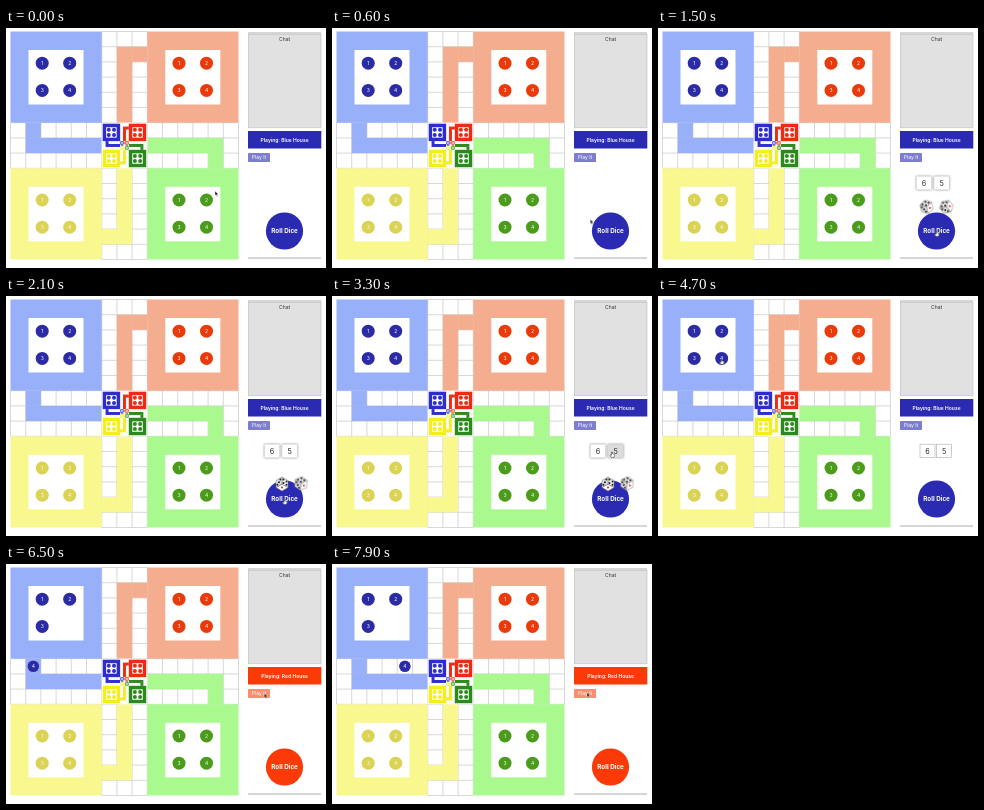
These frames come from a looping animation (320 px wide and 240 px high, 8000 ms). An HTML page:

```html
<!DOCTYPE html>
<html lang="en">
<head>
<meta charset="utf-8">
<title>Board game</title>
<style>
html, body { margin: 0; height: 100%; overflow: hidden; background: #fff; }
svg { display: block; width: 320px; height: 240px; }
text { font-family: Inter, Roboto, sans-serif; text-anchor: middle; font-size: 5px; fill: #333; }
.w { fill: #fff; }
.b { font-weight: 600; }
.num { font-size: 7.4px; }
.step { animation: 8s step-end infinite; }
.move { animation: 8s ease-in-out infinite; }
.theme { animation-name: theme; }
.before { animation-name: before; }
.after { animation-name: after; }
.rolled { animation-name: rolled; }
.picked { animation-name: picked; }
.chosen { animation-name: chosen; }
.hover { animation-name: hover; }
.play { animation-name: play; }
.walk { animation-name: walk; }
.arrow { animation-name: arrow; }
.hand { animation-name: hand; }
.cursor { animation-name: cursor; }
.die1 { animation-name: die1; animation-timing-function: ease-out; }
.die2 { animation-name: die2; animation-timing-function: ease-out; }

@keyframes theme { 0% { fill: #2a2ab2 } 78.75%, 100% { fill: #fb3a08 } }
@keyframes before { 0% { opacity: 1 } 78.75%, 100% { opacity: 0 } }
@keyframes after { 0% { opacity: 0 } 78.75%, 100% { opacity: 1 } }
@keyframes rolled { 0% { opacity: 0 } 12.5% { opacity: 1 } 45%, 100% { opacity: 0 } }
@keyframes picked { 0% { opacity: 0 } 45% { opacity: 1 } 78.75%, 100% { opacity: 0 } }
@keyframes chosen { 0% { opacity: 0 } 61.25% { opacity: 1 } 78.75%, 100% { opacity: 0 } }
@keyframes hover { 0% { fill: #fff } 37.5% { fill: #dcdcdc } 45%, 100% { fill: #fff } }
@keyframes play { 0% { opacity: .6 } 61.25% { opacity: 1 } 78.75%, 100% { opacity: .58 } }
@keyframes walk {
  0% { opacity: 0; transform: translate(27.3px, 102.3px) }
  78.75% { opacity: 1; transform: translate(27.3px, 102.3px) }
  85% { opacity: 1; transform: translate(42.5px, 102.3px) }
  91.25% { opacity: 1; transform: translate(57.7px, 102.3px) }
  97.5%, 100% { opacity: 1; transform: translate(72.9px, 102.3px) }
}
@keyframes arrow {
  0%, 29.5%, 47%, 67% { opacity: 1 }
  10.6%, 37%, 56.5%, 70% { opacity: 0 }
  78.75%, 100% { opacity: 1 }
}
@keyframes hand {
  0%, 29.5%, 47%, 67% { opacity: 0 }
  10.6%, 37%, 56.5%, 70% { opacity: 1 }
  78.75%, 100% { opacity: 0 }
}
@keyframes cursor {
  0%, 1.25% { transform: translate(209px, 163px) }
  11.25%, 27.5% { transform: translate(278.5px, 203px) }
  37.5%, 45% { transform: translate(280px, 156px) }
  57.5%, 65% { transform: translate(63.5px, 63px) }
  70.5%, 78.75% { transform: translate(259px, 129.5px) }
  87.5%, 100% { transform: translate(255px, 128.5px) }
}
@keyframes die1 {
  0%, 12.5% { transform: translate(253px, 167px) rotate(-75deg) }
  13.75% { transform: translate(258px, 171px) rotate(-35deg) }
  18% { transform: translate(267px, 177px) rotate(90deg) }
  25%, 100% { transform: translate(276px, 188px) rotate(180deg) }
}
@keyframes die2 {
  0%, 12.5% { transform: translate(272px, 166px) rotate(-50deg) }
  13.75% { transform: translate(277px, 170px) rotate(-10deg) }
  18% { transform: translate(287px, 177px) rotate(70deg) }
  25%, 100% { transform: translate(295px, 187.5px) rotate(125deg) }
}
</style>
</head>
<body>
<svg id="stage" viewBox="0 0 320 240"></svg>
<script>
const CELL = 15.2, X0 = 4.5, Y0 = 3.5;

const rect = (x, y, w, h, fill, extra = '') =>
  `<rect x="${x}" y="${y}" width="${w}" height="${h}" ${fill ? `fill="${fill}"` : ''} ${extra}/>`;
const text = (x, y, s, cls = '', extra = '') => `<text x="${x}" y="${y}" class="${cls}" ${extra}>${s}</text>`;
const token = (x, y, n, fill, r = 6.5) =>
  `<circle cx="${x}" cy="${y}" r="${r}" fill="${fill}"/>` + text(x, y + 1.8, n, 'w');
const cells = (c, r, w, h, fill) => rect(c * CELL, r * CELL, w * CELL, h * CELL, fill);

// col, row, pale, strong, home lane, start cell
const houses = [
  [0, 0, '#98aff9', '#2b2ba6', [1, 7, 5, 1], [1, 6, 1, 1]],
  [9, 0, '#f4ae8f', '#ea3a0a', [7, 1, 1, 5], [8, 1, 1, 1]],
  [0, 9, '#f8f88f', '#dad354', [7, 9, 1, 5], [6, 13, 1, 1]],
  [9, 9, '#aaf98f', '#4a9c1a', [9, 7, 5, 1], [13, 8, 1, 1]]
];
const vivid = ['#2d2dcc', '#ee2a12', '#f4ee20', '#2c8a1c'];

function grid() {
  let d = '';
  for (let i = 0; i <= 15; i++) {
    const p = i * CELL, end = 15 * CELL;
    const mid = i >= 6 && i <= 9;
    const a = mid ? 0 : 6 * CELL, b = mid ? end : 9 * CELL;
    d += `M${p} ${a}V${b}M${a} ${p}H${b}`;
  }
  return `<path d="${d}" fill="none" stroke="#c8c8c8" stroke-width=".7"/>`;
}

function board(depth) {
  let out = rect(0, 0, 15 * CELL, 15 * CELL, '#fff') + grid();
  houses.forEach(([c, r, pale, strong, lane, start], i) => {
    const fill = depth ? vivid[i] : pale;
    out += cells(c, r, 6, 6, fill) + cells(...lane, fill) + cells(...start, fill);
    const x = c * CELL, y = r * CELL;
    out += rect(x + 18, y + 18.5, 55, 54.5, '#fff');
    for (let n = 0; n < 4; n++) {
      const tx = x + 31.7 + n % 2 * 27.5, ty = y + 31.7 + (n >> 1) * 27.2;
      if (depth) out += `<circle cx="${tx}" cy="${ty}" r="10.5" fill="${fill}"/>`;
      else if (i === 0 && n === 3) out += `<g class="step before">${token(tx, ty, 4, strong)}</g>`;
      else out += token(tx, ty, n + 1, strong);
    }
  });
  out += cells(6, 6, 3, 3, '#fff');
  if (depth < 2)
    out += `<g transform="translate(${6 * CELL + 1} ${6 * CELL + 1}) scale(.191)">${board(depth + 1)}</g>`;
  return out;
}

function numbers(x, gap, y, cls, attrs) {
  return `<g class="step ${cls}">` + [6, 5].map((n, i) =>
    rect(x + i * gap, y, 15, 13.4, '#fff', attrs + (cls === 'rolled' && i ? ' class="step hover"' : '')) +
    text(x + i * gap + 7.5, y + 9.4, n, 'num')).join('') + '</g>';
}

function die(cls) {
  const face = (d, fill) => `<path d="${d}" fill="${fill}" stroke="#777" stroke-width=".5"/>`;
  const pip = (x, y, fill = '#222') => `<circle cx="${x}" cy="${y}" r="1" fill="${fill}"/>`;
  return `<g class="move ${cls}">` +
    face('M0-7L6-3.5L0 0L-6-3.5Z', '#fff') + face('M-6-3.5L0 0V7L-6 3.5Z', '#f0f0f0') +
    face('M6-3.5L0 0V7L6 3.5Z', '#dedede') +
    pip(0, -3.5, '#d3202a') +
    pip(-4.5, -.8) + pip(-1.5, 1) + pip(-4.5, 2.6) + pip(-1.5, 4.6) +
    pip(1.6, 4.4) + pip(3, 1.7) + pip(4.6, -.7) + '</g>';
}

const shadow = 'stroke="#ddd" stroke-width=".4" style="filter:drop-shadow(.4px .8px .8px #0007)"';
const line = y => `<path d="M242 ${y}H315" stroke="#999" stroke-width=".8"/>`;

document.getElementById('stage').innerHTML =
  `<g transform="translate(${X0} ${Y0})">${board(0)}</g>` +
  line(5) + line(230) +
  rect(242.3, 6.3, 72.7, 93.5, '#e1e1e1', 'stroke="#bdbdbd" stroke-width=".6"') +
  text(278.6, 12.6, 'Chat') +
  rect(242, 103, 73.3, 17.5, '', 'class="step theme"') +
  text(278.6, 113.6, 'Playing: Blue House', 'w b step before') +
  text(278.6, 113.6, 'Playing: Red House', 'w b step after') +
  `<g class="step play">${rect(242, 125, 22, 9, '', 'rx=".8" class="step theme"')}</g>` +
  text(253, 131.3, 'Play It', 'w') +
  `<g class="step chosen">${text(288, 131.3, 'Selected Seed:', '', 'style="font-size:4.8px"')}` +
  `${token(291, 142, 4, '#2b2ba6', 6)}</g>` +
  numbers(258.5, 17.6, 148.3, 'rolled', shadow) +
  numbers(262, 16.6, 148.2, 'picked', 'stroke="#aaa" stroke-width=".6"') +
  '<circle cx="278.5" cy="203" r="18.6" class="step theme"/>' +
  text(278.6, 205.3, 'Roll Dice', 'w', 'style="font-size:6.3px;font-weight:700"') +
  `<g class="step rolled">${die('die1')}${die('die2')}</g>` +
  `<g class="step walk">${token(0, 0, 4, '#2b2ba6', 5.8)}</g>` +
  '<g class="move cursor">' +
  '<path class="step arrow" d="M0 0V4.6L1.1 3.6L1.9 5.3L2.7 4.9L1.9 3.3H3.3Z" fill="#111" stroke="#fff" stroke-width=".4"/>' +
  '<path class="step hand" d="M-.5 0Q0-.5.5 0V1.8L2.3 2.3Q2.8 2.5 2.6 3.5L2 5.4H-.7L-2 3.3Q-1.7 2.5-.5 3.3Z" fill="#fff" stroke="#222" stroke-width=".5"/>' +
  '</g>';
</script>
</body>
</html>
```
